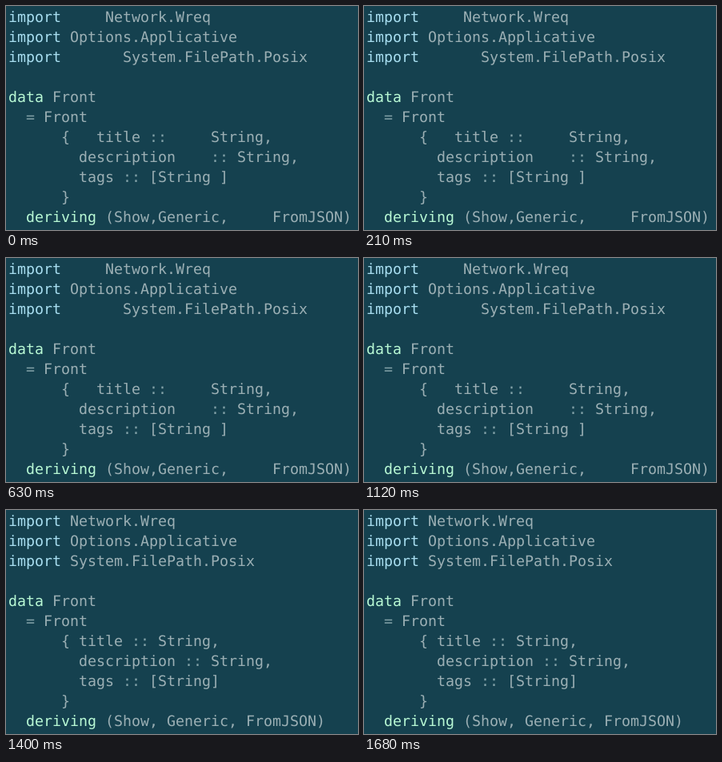
These frames come from a looping animation (440x280 px, 2.59 s). An HTML page:

```html
<!DOCTYPE html>
<html lang="en">
<head>
<meta charset="utf-8">
<title>Code formatting</title>
<style>
  html, body { margin: 0; width: 100%; height: 100%; overflow: hidden; background: #15414f; }
  svg { display: block; width: 440px; height: 280px; }
  text {
    font: 18.28px "DejaVu Sans Mono", "Liberation Mono", monospace;
    text-rendering: geometricPrecision;
    fill: #9bafb4;
    white-space: pre;
  }
  .import { fill: #a8def0; }
  .keyword { fill: #b8f8d4; }
  .op { fill: #83a2a8; }
</style>
</head>
<body>
<svg viewBox="0 0 440 280">
  <rect width="440" height="280" fill="#15414f"/>
  <g id="before"></g>
  <g id="after"></g>
</svg>
<script>
const LOOP = 2590, FORMAT_AT = 1400;
const LEFT = 3, BASELINE = 20, LINE = 25;
const NS = "http://www.w3.org/2000/svg";

const messy = `import     Network.Wreq
import Options.Applicative
import       System.FilePath.Posix

data Front
  = Front
      {   title ::     String,
        description    :: String,
        tags :: [String ]
      }
  deriving (Show,Generic,     FromJSON)`;

const tidy = `import Network.Wreq
import Options.Applicative
import System.FilePath.Posix

data Front
  = Front
      { title :: String,
        description :: String,
        tags :: [String]
      }
  deriving (Show, Generic, FromJSON)`;

function tokenClass(token) {
  if (token === "import") return "import";
  if (token === "data" || token === "deriving") return "keyword";
  return token === "=" || token === "::" ? "op" : "";
}

function build(id, code) {
  const group = document.getElementById(id);
  code.split("\n").forEach((line, row) => {
    const text = document.createElementNS(NS, "text");
    text.setAttribute("x", LEFT);
    text.setAttribute("y", BASELINE + row * LINE);
    for (const token of line.split(/(\bimport\b|\bdata\b|\bderiving\b|::|=)/)) {
      if (!token) continue;
      const span = document.createElementNS(NS, "tspan");
      const cls = tokenClass(token);
      if (cls) span.setAttribute("class", cls);
      span.textContent = token;
      text.append(span);
    }
    group.append(text);
  });
  return group;
}

const before = build("before", messy);
const after = build("after", tidy);
const start = performance.now();

function draw(ms) {
  const formatted = ms >= FORMAT_AT;
  before.setAttribute("visibility", formatted ? "hidden" : "visible");
  after.setAttribute("visibility", formatted ? "visible" : "hidden");
}

function tick() {
  draw((performance.now() - start) % LOOP);
  requestAnimationFrame(tick);
}

draw(0);
requestAnimationFrame(tick);
</script>
</body>
</html>
```
